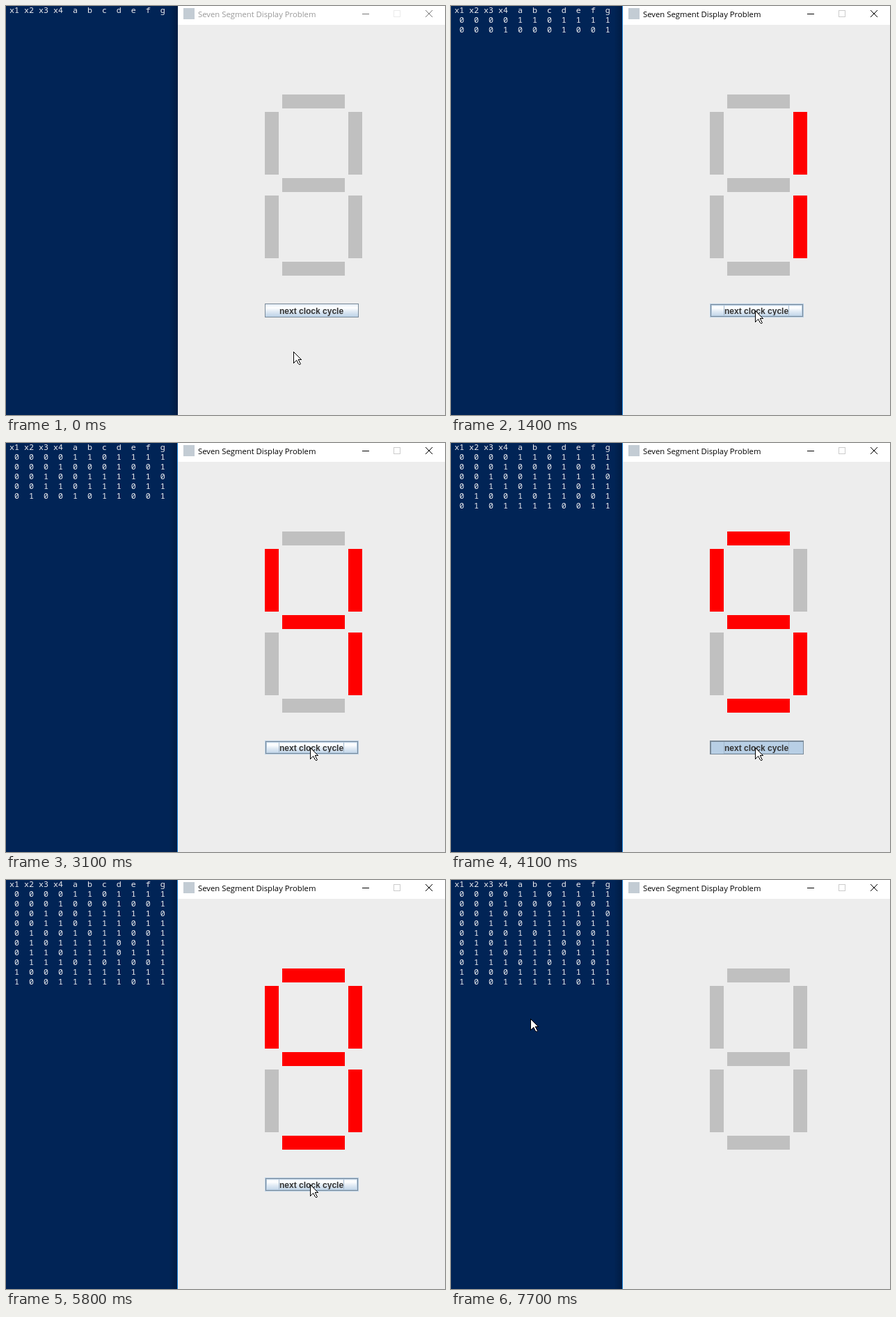
Animation of 631x587 px, one loop 7900 ms. Source, as an HTML page with a canvas:

```html
<!DOCTYPE html>
<html lang="en">
<head>
<meta charset="utf-8">
<title>Seven Segment Display</title>
<style>
  html, body { margin: 0; width: 100%; height: 100%; overflow: hidden; background: #012456; }
  canvas { display: block; }
</style>
</head>
<body>
<canvas id="stage" width="631" height="587"></canvas>
<script>
const ctx = document.getElementById('stage').getContext('2d');
const LOOP = 7900, STEP = 100;
const FIRST = 909, PERIOD = 549;   // click rhythm
const DIGITS = 10;

// For each segment a..g, the digits that leave it dark
const DARK = ['1237', '14', '017', '56', '134579', '147', '2'];

// Pointer stops: time, x, y
const STOPS = [
  [100, 413, 496], [500, 437, 437], [6500, 437, 437], [7100, 70, 181],
  [7300, 130, 209], [7500, 110, 177], [7700, 114, 199]
];

const isLit = (segment, digit) => !DARK[segment].includes(digit);

function box(x, y, w, h, color) {
  ctx.fillStyle = color;
  ctx.fillRect(x, y, w, h);
}

function frame(x, y, w, h, color) {
  ctx.strokeStyle = color;
  ctx.lineWidth = 1;
  ctx.strokeRect(x + .5, y + .5, w - 1, h - 1);
}

function text(str, x, y, font, color) {
  ctx.font = font;
  ctx.fillStyle = color;
  ctx.fillText(str, x, y);
}

// Truth table line: four input bits, then the seven segments
function tableRow(digit) {
  const inputs = [...digit.toString(2).padStart(4, '0')];
  const outputs = DARK.map((_, s) => (isLit(s, digit) ? 1 : 0));
  return ' ' + [...inputs, ...outputs].join('  ');
}

function drawConsole(rows) {
  box(0, 0, 247, 587, '#012456');
  const shade = ctx.createLinearGradient(234, 0, 247, 0);
  shade.addColorStop(0, 'rgba(0,0,0,0)');
  shade.addColorStop(1, 'rgba(0,0,0,.24)');
  box(234, 0, 13, 587, shade);

  const font = '11.667px "Noto Sans Mono", "DejaVu Sans Mono", monospace';
  text('x1 x2 x3 x4  a  b  c  d  e  f  g', 5, 10, font, '#eeedf0');
  for (let n = 0; n < rows; n++) text(tableRow(n), 5, 24 + 14 * n, font, '#eeedf0');
}

function drawWindow(active) {
  if (active) box(246, 0, 1, 587, '#1883d7');
  box(247, 0, 384, 27, '#fff');
  box(247, 27, 384, 560, '#ededed');
  box(255, 3, 16, 16, '#c3ccd4');
  text('Seven Segment Display Problem', 276, 16,
    '11.3px "Open Sans", "Noto Sans", sans-serif', active ? '#000' : '#999');

  const ink = active ? '#000' : '#777';
  box(512, 11, 10, 1, ink);
  frame(557, 6, 10, 10, active ? '#ccc' : '#ebebeb');
  ctx.strokeStyle = ink;
  ctx.lineWidth = 1;
  ctx.beginPath();
  ctx.moveTo(603, 6);
  ctx.lineTo(613, 16);
  ctx.moveTo(613, 6);
  ctx.lineTo(603, 16);
  ctx.stroke();
}

function drawDigit(digit) {
  const color = s => (digit >= 0 && isLit(s, digit) ? '#f00' : '#c0c0c0');
  [1, 2, 5].forEach((s, i) => box(397, 127 + 120 * i, 90, 20, color(s)));
  [0, 3, 4, 6].forEach((s, i) => {
    box(372 + 120 * (i % 2), 152 + 120 * (i >> 1), 20, 90, color(s));
  });
}

function drawButton(hover, pressed, focused) {
  const x = 372, y = 427, w = 135, h = 20;
  const dark = '#7a8a99', light = '#b8cfe5';
  let fill = light;
  if (!pressed) {
    fill = ctx.createLinearGradient(0, y, 0, y + h);
    fill.addColorStop(0, '#dde8f3');
    fill.addColorStop(.3, '#fff');
    fill.addColorStop(.6, '#dde8f3');
    fill.addColorStop(1, light);
  }
  box(x, y, w, h, fill);
  text('next clock cycle', 393, 442, 'bold 12px "Liberation Sans", Arial, sans-serif', '#333');
  if (focused) frame(392, 428, 94, 18, '#a3b8cc');

  if (pressed) {
    frame(x, y, w, h, dark);
    box(x, y, w, 2, dark);
    box(x, y, 2, h, dark);
  } else if (hover) {
    frame(x, y, w, h, light);
    frame(x + 2, y + 2, w - 4, h - 4, light);
    frame(x + 1, y + 1, w - 2, h - 2, dark);
  } else {
    frame(x, y, w, h, dark);
  }
}

// Arrow built from pixel rows: a wedge, then its shrinking notch and the tail
function drawPointer(x, y) {
  const span = (from, to, row) => {
    box(x + from, y + row, to - from + 1, 1, '#000');
    if (to - from > 1) box(x + from + 1, y + row, to - from - 1, 1, '#fff');
  };
  for (let r = 0; r < 12; r++) span(0, r, r);
  box(x + 7, y + 11, 5, 1, '#000');
  for (let r = 12; r < 18; r++) {
    const tail = 4 + ((r - 11) >> 1);
    if (r < 17) span(0, 16 - r, r);
    span(tail, tail + 3, r);
  }
  span(8, 9, 18);
}

function pointerAt(t) {
  const i = STOPS.findIndex(stop => stop[0] > t);
  if (i === 0) return STOPS[0].slice(1);
  if (i < 0) return STOPS[STOPS.length - 1].slice(1);
  const [t0, x0, y0] = STOPS[i - 1], [t1, x1, y1] = STOPS[i];
  const u = (t - t0) / (t1 - t0), e = u * u * (3 - 2 * u);
  return [Math.round(x0 + (x1 - x0) * e), Math.round(y0 + (y1 - y0) * e)];
}

function clicksBy(t) {
  const count = Math.floor((t + STEP - 1 - FIRST) / PERIOD) + 1;
  return Math.min(DIGITS + 1, Math.max(0, count));
}

function draw(time) {
  const t = Math.floor((time % LOOP) / STEP) * STEP;
  const clicks = clicksBy(t), next = clicksBy(t + STEP);
  const open = clicks <= DIGITS;
  const [px, py] = pointerAt(t);

  drawConsole(Math.min(clicks, DIGITS));
  drawWindow(next > 0);
  drawDigit(open ? clicks - 1 : -1);
  if (open) {
    const hover = px >= 372 && px < 507 && py >= 427 && py < 447;
    drawButton(hover, next > clicks, next > 0);
  }
  drawPointer(px, py);
}

const start = performance.now();
function tick() {
  draw(performance.now() - start);
  requestAnimationFrame(tick);
}
tick();
</script>
</body>
</html>
```
